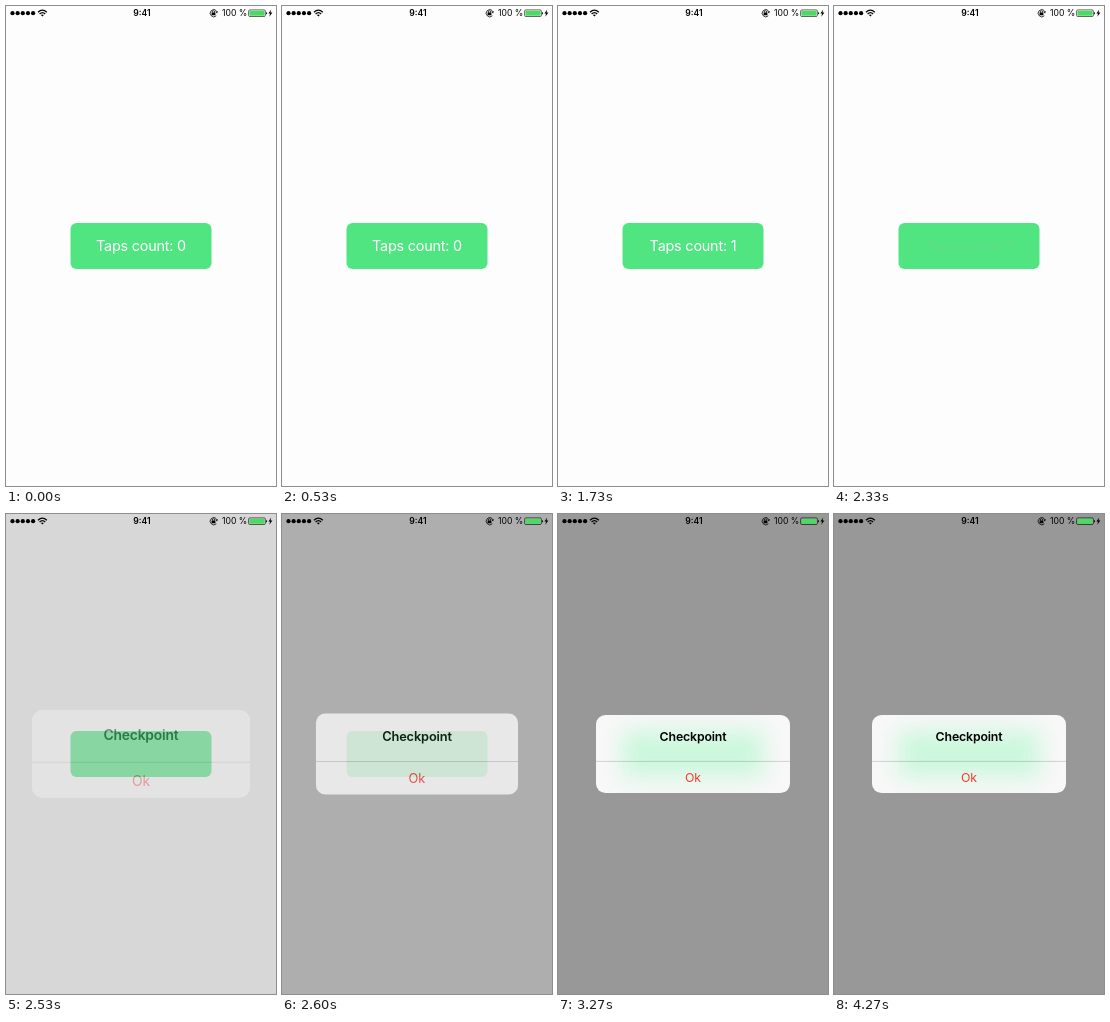
Animation of 270x480 px, one loop 4.54 s. Source, as an HTML page:

```html
<!DOCTYPE html>
<html lang="en">
<head>
<meta charset="utf-8">
<title>Tap counter</title>
<style>
  html, body { margin: 0; height: 100%; overflow: hidden; background: #fefdfe; }
  svg { display: block; width: 100%; height: 100%; }
  text { font-family: Inter, Roboto, "Liberation Sans", sans-serif; }
  .mid { text-anchor: middle; }
  #label { font-size: 14.4px; letter-spacing: -.2px; }
  #title { font-size: 12.3px; font-weight: 600; letter-spacing: -.15px; }
  #ok { font-size: 12.3px; fill: #f43a30; }
  .bar text { font-size: 8.64px; }
</style>
</head>
<body>
<svg viewBox="0 0 270 480">
  <defs>
    <filter id="blur" filterUnits="userSpaceOnUse" x="0" y="150" width="270" height="180" color-interpolation-filters="sRGB">
      <feGaussianBlur stdDeviation="11"/>
    </filter>
    <clipPath id="panelClip"><rect x="38" y="201" width="194" height="78" rx="9.4"/></clipPath>
  </defs>

  <rect width="270" height="480" fill="#fefdfe"/>
  <rect x="64.5" y="217" width="141" height="46" rx="6" fill="#51e582"/>
  <text id="label" class="mid" x="135" y="245"></text>

  <rect id="dim" width="270" height="480"/>

  <g id="alert">
    <g clip-path="url(#panelClip)">
      <rect x="38" y="201" width="194" height="78" fill="#f8f8f8"/>
      <rect id="glow" x="64.5" y="217" width="141" height="46" fill="#cbf7dc" filter="url(#blur)"/>
      <rect x="38" y="246.9" width="194" height=".8" fill-opacity=".2"/>
    </g>
    <text id="title" class="mid" x="135" y="227.3">Checkpoint</text>
    <text id="ok" class="mid" x="135" y="268.2">Ok</text>
  </g>

  <g class="bar">
    <g id="dots"></g>
    <g fill="none" stroke="#000" stroke-width="1.3">
      <path d="M32 6.2Q36.4 2 40.8 6.2M33.6 7.9Q36.4 5.3 39.2 7.9"/>
    </g>
    <path d="M36.4 10.6L34.9 9Q36.4 7.8 37.9 9Z"/>
    <text class="mid" x="136" y="10.3" font-weight="600">9:41</text>
    <g fill="none" stroke="#000" stroke-width=".8">
      <path d="M210.3 4.6A3.6 3.6 0 1 0 210.3 9.8"/>
      <path d="M206.3 6.8V5.9a1.2 1.2 0 0 1 2.4 0V6.8"/>
    </g>
    <rect x="205.6" y="6.6" width="3.8" height="2.7" rx=".4"/>
    <path d="M209.3 5.4L211.9 5.2L211 7.4Z"/>
    <text x="216" y="10.3">100 %</text>
    <rect x="242.6" y="3.9" width="16.8" height="6.6" rx="1.3" fill="none" stroke="#000" stroke-width=".6"/>
    <rect x="243.4" y="4.7" width="15.2" height="5" rx=".7" fill="#4cd964"/>
    <path d="M260.1 6v2.4q1-.3 1-1.2t-1-1.2Z"/>
    <path d="M265.2 3.6L262.4 7.6H264.1L263.3 10.8L266.4 6.5H264.5Z"/>
  </g>
</svg>
<script>
  const LOOP = 4540;
  const TICK = 200 / 3;
  const ALERT_AT = 2530;
  const WHITE = "#fff", FADED = "#9ab8a0";

  // start time, taps, colour, opacity
  const labelSteps = [
    [0, 0, WHITE, 1],
    [1270, 0, FADED, .3],
    [1400, 1, WHITE, .18],
    [1470, 1, WHITE, .42],
    [1530, 1, WHITE, .66],
    [1600, 1, WHITE, .85],
    [1670, 1, WHITE, .95],
    [1730, 1, WHITE, 1],
    [2330, 1, FADED, .2],
    [ALERT_AT, 1, FADED, 0]
  ];

  const el = id => document.getElementById(id);
  const [label, dim, alertBox, glow] = ["label", "dim", "alert", "glow"].map(el);

  el("dots").innerHTML = [0, 1, 2, 3, 4]
    .map(i => `<circle cx="${6.5 + i * 5.15}" cy="7.2" r="2.1"/>`).join("");

  // Critically damped spring, held for each tick
  function spring(t) {
    if (t < ALERT_AT) return 0;
    const k = Math.floor((t - ALERT_AT + 4) / TICK);
    if (k >= 6) return 1;
    const x = 1.3 + 1.6 * k;
    return 1 - (1 + x) * Math.exp(-x);
  }

  function draw(t) {
    const [, taps, color, alpha] = labelSteps.findLast(s => s[0] <= t);
    label.textContent = `Taps count: ${taps}`;
    label.setAttribute("fill", color);
    label.setAttribute("opacity", alpha);

    const p = spring(t);
    const scale = 1.2 - .2 * p;
    dim.setAttribute("opacity", .4 * p);
    alertBox.setAttribute("opacity", p);
    alertBox.setAttribute("transform", `translate(135 240) scale(${scale}) translate(-135 -240)`);
    // The backdrop blur only shows once the panel is opaque
    glow.setAttribute("opacity", p === 1 ? 1 : 0);
  }

  const start = performance.now();
  function frame() {
    draw((performance.now() - start) % LOOP);
    requestAnimationFrame(frame);
  }
  frame();
</script>
</body>
</html>
```
